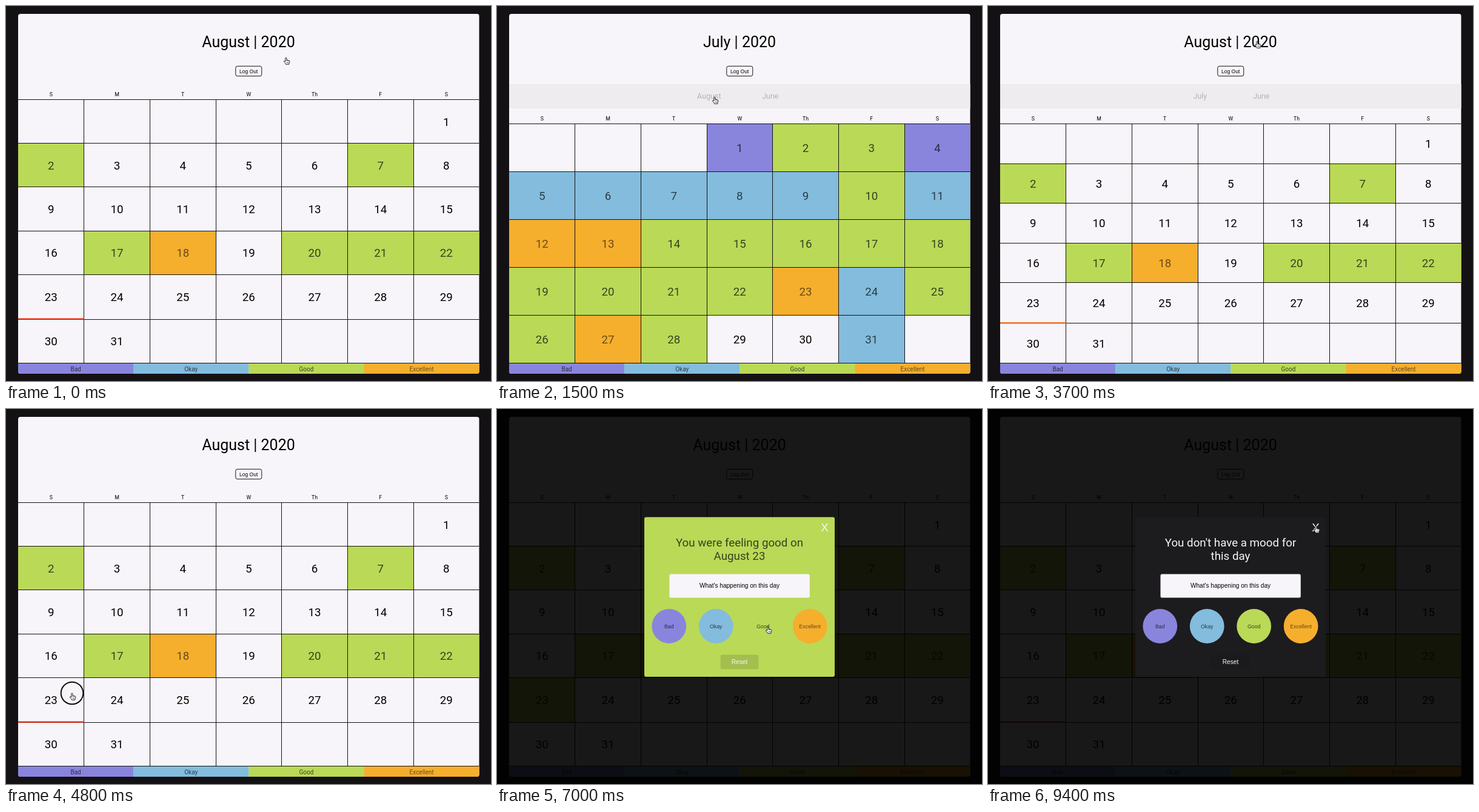
Recreate the animation shown at these times as an HTML page. Size 800x619 px, loop 9.5 s.

```html
<!DOCTYPE html>
<html lang="en">
<head>
<meta charset="utf-8">
<title>Mood calendar</title>
<style>
  html, body { margin: 0; width: 100%; height: 100%; overflow: hidden; background: #131114; }
  svg { display: block; width: 800px; height: 619px; }
  text { text-anchor: middle; font-family: Roboto, sans-serif; }
  .ui { font-family: "Liberation Sans", Arial, sans-serif; }
</style>
</head>
<body>
<svg id="stage" viewBox="0 0 800 619"></svg>
<script>
const LOOP = 9500, STEP = 100;
const LEFT = 20, TOP = 13, BOTTOM = 607, COL = 108.67, WIDTH = COL * 7, GRID_END = 589.5;
const INK = '#131114', PAPER = '#f7f5f9', TODAY = 23;

// Keyed by the letters used in the month strings
const MOODS = {
  b: { name: 'Bad', fill: '#8985dd', ink: '#2b2a40' },
  o: { name: 'Okay', fill: '#83bcdd', ink: '#2a3c47' },
  g: { name: 'Good', fill: '#bad957', ink: '#38421f' },
  e: { name: 'Excellent', fill: '#f6ae2d', ink: '#694b18' }
};
const MONTHS = {
  August: { start: 6, days: '-g----g---------ge-ggg---------' },
  July: { start: 3, days: 'bggbooooogoeegggggggggeoggeg--o' },
  June: { start: 1, days: 'ggogeoggbooggegggoobgggeegogog' }
};

// Each track is [time, value]; the last entry reached applies
const MONTH = [[0, 'August'], [1300, 'July'], [2300, 'June'], [3200, 'August']];
const PICKED = [[0, '-'], [6200, 'b'], [6500, 'o'], [6900, 'g'], [7700, 'e'], [8700, '-']];
const SAVED = [[0, '-'], [6200, 'b'], [6500, 'o'], [6900, 'g'], [8100, 'e'], [8700, '-']];
const CLICKS = [500, 1200, 2200, 3100, 3800, 4800, 6100, 6400, 6800, 7600, 8600];
const POINTER = [
  [0, 462, 85], [500, 432, 54], [700, 432, 54], [1100, 360, 150], [1500, 359, 150],
  [2000, 450, 148], [2400, 450, 148], [3000, 352, 150], [3200, 352, 150],
  [3700, 444, 58], [3900, 444, 59], [4800, 109, 469], [5000, 74, 470],
  [5800, 294, 364], [6100, 294, 364], [6400, 367, 360], [6500, 367, 360],
  [6800, 447, 359], [7100, 447, 359], [7600, 522, 360], [7800, 522, 360],
  [8500, 402, 415], [8700, 402, 415], [9000, 280, 328], [9400, 541, 193]
];

const clamp = v => Math.min(1, Math.max(0, v));
const ease = v => v * v * (3 - 2 * v);
const ramp = (t, from, to) => ease(clamp((t - from) / (to - from)));
const at = (track, t) => track.filter(k => k[0] <= t).pop()[1];

function pointerAt(t) {
  const i = POINTER.findIndex(k => k[0] > t);
  if (i < 0) return POINTER[POINTER.length - 1].slice(1);
  const [t0, x0, y0] = POINTER[i - 1], [t1, x1, y1] = POINTER[i];
  const k = ramp(t, t0, t1);
  return [x0 + (x1 - x0) * k, y0 + (y1 - y0) * k];
}

const rect = (x, y, w, h, fill, extra = '') =>
  `<rect x="${x}" y="${y}" width="${w}" height="${h}" fill="${fill}" ${extra}/>`;
const line = (x1, y1, x2, y2, color = INK, w = 1) =>
  `<path d="M${x1} ${y1}L${x2} ${y2}" stroke="${color}" stroke-width="${w}"/>`;
// y is the middle of the capital letters
const text = (x, y, size, str, fill = '#000', cls = '') =>
  `<text x="${x}" y="${y + size * .356}" font-size="${size}" fill="${fill}" class="${cls}">${str}</text>`;

function header(month, open) {
  let out = text(400, 59, 25, `${month} | 2020`);
  out += rect(378.8, 99.3, 43, 16.4, 'none', `rx="3" stroke="${INK}"`);
  out += text(400.2, 107.5, 8.5, 'Log Out', '#000', 'ui');
  if (open > 0) {
    const others = Object.keys(MONTHS).filter(m => m !== month);
    const links = others.map((m, i) => text(349.8 + i * 101, 149, 12.5, m, '#b5b3b7')).join('');
    out += rect(LEFT, 129, WIDTH, 40 * open, '#eeecef') + `<g opacity="${open}">${links}</g>`;
  }
  return out;
}

function grid(month, open, t) {
  const { start, days } = MONTHS[month];
  const top = 154.5 + 40 * open;
  const rows = Math.ceil((start + days.length) / 7);
  const todayRow = month === 'August' ? Math.floor((start + TODAY - 1) / 7) : rows;
  const extra = todayRow < rows ? 1.8 : 0;
  const h = (GRID_END - top - extra) / rows;
  const rowY = r => top + r * h + (r > todayRow ? extra : 0);
  let fills = '', lines = '', labels = '';

  ['S', 'M', 'T', 'W', 'Th', 'F', 'S'].forEach((d, i) => {
    labels += text(LEFT + (i + .5) * COL, top - 8.2, 8.75, d);
  });
  for (let day = 1; day <= days.length; day++) {
    const cell = start + day - 1, r = Math.floor(cell / 7);
    const x = LEFT + cell % 7 * COL, y = rowY(r), bottom = rowY(r + 1);
    const today = month === 'August' && day === TODAY;
    const mood = MOODS[today ? at(SAVED, t) : days[day - 1]];
    if (mood) fills += rect(x, y, COL, bottom - y, mood.fill);
    labels += text(x + COL / 2, (y + bottom) / 2 + (today ? -.4 : .3), 18.75, day, mood ? mood.ink : '#000');
  }
  for (let r = 0; r <= rows; r++) {
    const y = Math.floor(rowY(r)) + .5;
    lines += line(LEFT, y, LEFT + WIDTH, y);
  }
  for (let c = 1; c < 7; c++) {
    const x = Math.floor(LEFT + c * COL) + .5;
    lines += line(x, top, x, GRID_END);
  }
  if (extra && at(SAVED, t) === '-') {
    const glow = (1 - Math.cos(t / 2400 * 2 * Math.PI)) / 2;
    const y = rowY(todayRow + 1) - .7;
    lines += line(LEFT, y, LEFT + COL, y, `rgb(${240 - 8 * glow},${50 + 64 * glow},${22 + 12 * glow})`, 2.4);
  }
  return fills + lines + labels;
}

function legend() {
  const w = WIDTH / 4;
  return Object.values(MOODS).map((m, i) =>
    rect(LEFT + i * w, 590, w + .3, BOTTOM - 590, m.fill) +
    text(LEFT + (i + .5) * w, 599, 10, m.name, m.ink)).join('');
}

function dialog(picked) {
  const mood = MOODS[picked];
  const ink = mood ? mood.ink : PAPER;
  const title = mood
    ? [`You were feeling ${mood.name.toLowerCase()} on`, `August ${TODAY}`]
    : ["You don't have a mood for", 'this day'];
  let out = rect(243, 178.5, 314, 263.5, mood ? mood.fill : '#1c1b1e', 'rx="3"');
  out += text(540.5, 195.5, 18.75, 'X', PAPER, 'ui');
  title.forEach((row, i) => { out += text(400, 220.7 + i * 22, 18.75, row, ink); });
  out += rect(284.5, 272.5, 231.3, 39, PAPER, 'rx="2.5"');
  out += text(400, 291.8, 10.1, "What's happening on this day", '#000', 'ui');
  Object.values(MOODS).forEach((m, i) => {
    const x = 283.8 + i * 77.45;
    out += `<circle cx="${x}" cy="358.5" r="28.4" fill="${m.fill}"/>`;
    out += text(x, 358.5, 8.8, m.name, m.ink, 'ui');
  });
  out += rect(368.7, 405.5, 62.6, 24, INK, 'rx="3" fill-opacity=".13"');
  return out + text(400, 417.3, 10.1, 'Reset', PAPER, 'ui');
}

function pointer(t) {
  const [x, y] = pointerAt(t);
  const ring = CLICKS.includes(t)
    ? '<circle r="18.3" fill="none" stroke="#0b0a0c" stroke-width="2"/>' : '';
  return `<g transform="translate(${x} ${y})">${ring}
    <path d="M-1.2 1C-1.2 -.3 .9 -.3 .9 1V4L4.6 4.9C5.8 5.2 6 5.9 5.9 6.8C5.7 8.5 4.9 9 4.8 11.4H-.4
      C-.8 9.6 -2.6 8.2 -3.5 6.8C-4 5.7 -2.8 5.2 -2.1 6L-1.2 7Z"
      fill="#fff" stroke="#111" stroke-width=".9" stroke-linejoin="round"/>
    <path d="M.9 4V6M2.6 4.6V6.2M4.2 5V6.5M1 7.6V9.8M2.5 7.6V9.8M4 7.6V9.8" stroke="#111" stroke-width=".6"/></g>`;
}

function scene(t) {
  const month = at(MONTH, t);
  const open = ramp(t, 600, 900) - ramp(t, 3900, 4200);
  const shade = .9 * ramp(t, 4800, 5000);
  const pop = ramp(t, 5000, 5200);
  return `<clipPath id="card">${rect(LEFT, TOP, WIDTH, BOTTOM - TOP, '#000', 'rx="4"')}</clipPath>
    ${rect(0, 0, 800, 619, INK)}
    <g clip-path="url(#card)">${rect(LEFT, TOP, WIDTH, BOTTOM - TOP, PAPER)}
    ${header(month, open)}${grid(month, open, t)}${legend()}</g>
    ${shade ? rect(0, 0, 800, 619, '#000', `opacity="${shade}"`) : ''}
    ${pop ? `<g opacity="${pop}">${dialog(at(PICKED, t))}</g>` : ''}
    ${pointer(t)}`;
}

const stage = document.getElementById('stage');
const begin = performance.now();
let shown = -1;
function tick() {
  const t = Math.floor((performance.now() - begin) % LOOP / STEP) * STEP;
  if (t !== shown) stage.innerHTML = scene(shown = t);
  requestAnimationFrame(tick);
}
tick();
</script>
</body>
</html>
```
